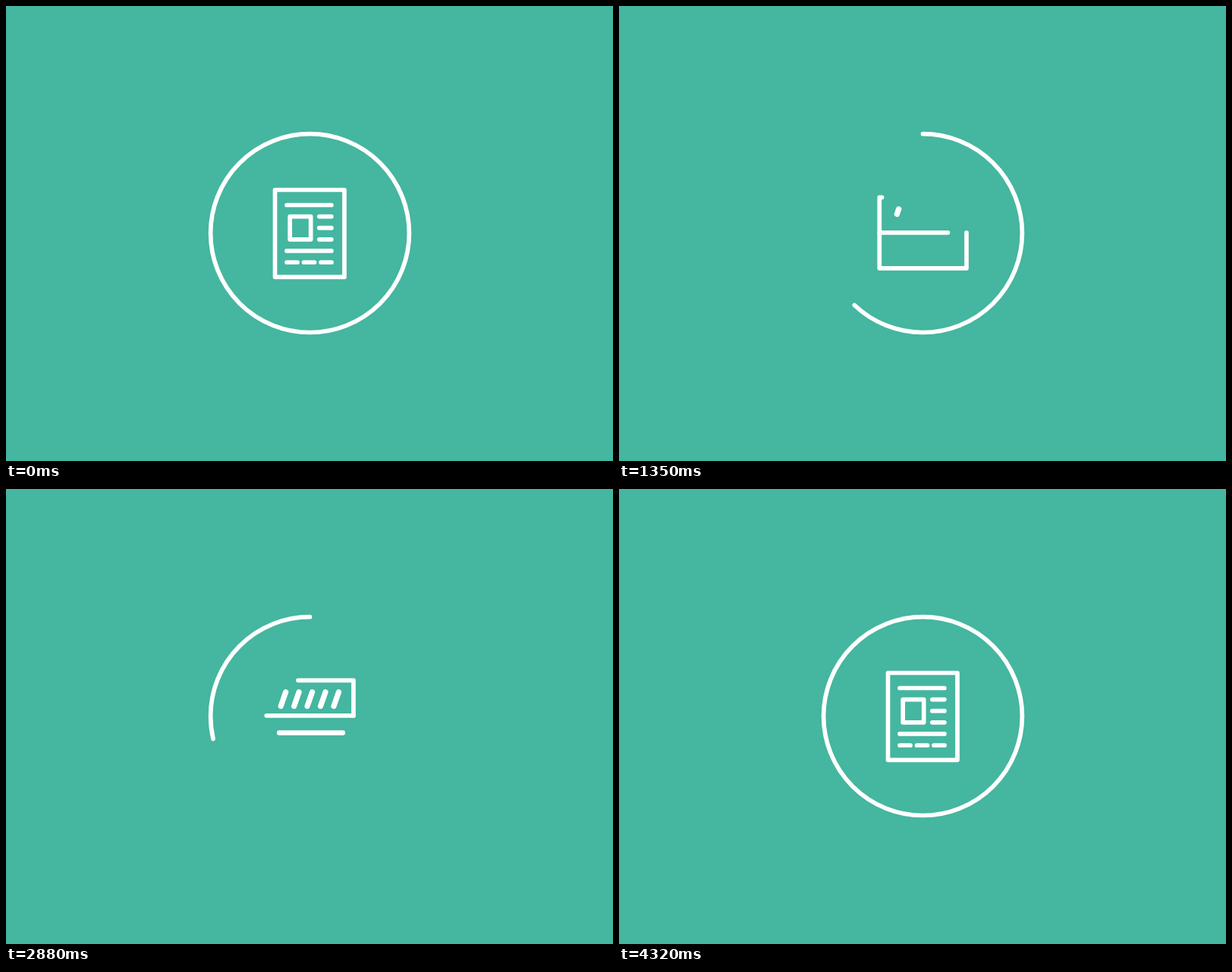
Animation of 800 by 600 pixels, one loop 4500 ms. Source, as an HTML page with a canvas:

```html
<!DOCTYPE html>
<html lang="en">
<head>
<meta charset="utf-8">
<title>Icon loop</title>
<style>
  html, body { margin: 0; width: 100%; height: 100%; overflow: hidden; background: #45b6a0; }
  canvas { display: block; }
</style>
</head>
<body>
<canvas id="stage" width="800" height="600"></canvas>
<script>
const ctx = document.getElementById('stage').getContext('2d');
const LOOP = 4500, TICK = 30, STROKE = 5.7;

const linear = x => x;
const smooth = x => x * x * (3 - 2 * x);
const easeOut = x => 1 - (1 - x) ** 3;

// A span is a stretch of time with an easing; it returns 0 to 1
const span = (start, duration, ease = linear) =>
  t => ease(Math.min(1, Math.max(0, (t - start) / duration)));

// One span per item, each starting a step after the one before
const stagger = (start, step, duration) => i => span(start + step * i, duration);

function polyline(points, width = STROKE) {
  const path = new Path2D();
  let length = 0;
  points.forEach(([x, y], i) => {
    if (i) length += Math.hypot(x - points[i - 1][0], y - points[i - 1][1]);
    path.lineTo(x, y);
  });
  return { path, length, width };
}

const row = (x, y, length, width) => polyline([[x, y], [x + length, y]], width);
const loop = (...points) => polyline([...points, points[0]]);

function makeRing() {
  const r = 130.9, path = new Path2D();
  path.arc(400.5, 299.6, r, -Math.PI / 2, Math.PI * 1.5);
  return { path, length: 2 * Math.PI * r, width: STROKE };
}
const ring = makeRing();

function pageFrame() {
  const l = 354.5, r = 446, t = 242.5, b = 357.3;
  return loop([400.6, t], [r, t], [r, b], [l, b], [l, t]);
}

function pageDetails() {
  const left = 370, right = 428.9, short = 16, dash = 14.1;
  const y = n => 262.5 + 15.1 * n;
  const photoLeft = 374.2, photoRight = 401.7;
  const photo = loop([photoRight, y(1)], [photoLeft, y(1)], [photoLeft, y(3)], [photoRight, y(3)]);
  const dashes = [0, 1, 2].map(i => row(left + 22.5 * i, y(5), dash));
  return [
    row(left, y(0), right - left),
    row(right, y(1), -short),
    row(right - short, y(2), short),
    photo,
    row(right, y(3), -short),
    row(left, y(4), right - left),
    ...dashes
  ];
}

const slateLeft = 343.3, slateRight = 458, slateMiddle = 298.8;

function slateFrame() {
  const l = slateLeft, r = slateRight, t = 252.3, b = 345.8;
  return loop([r, slateMiddle], [r, b], [l, b], [l, t], [r, t]);
}

function slateDetails() {
  const stripes = Array.from({ length: 5 }, (_, i) => {
    const x = 368.7 + 17.45 * i, y = 267.8;
    return polyline([[x, y], [x - 6.5, y + 18.6]], 7.2);
  });
  return [
    row(slateLeft, slateMiddle, slateRight - slateLeft),
    ...stripes,
    row(360, 321.5, 84, 6.4)
  ];
}

// grow moves a line's end along it, wipe moves its beginning
const always = (shapes, grow, wipe) => shapes.map(shape => ({ shape, grow, wipe }));
const inTurn = (shapes, grow, wipe) =>
  shapes.map((shape, i) => ({ shape, grow: grow(i), wipe: wipe(i) }));

// The page stays on screen across the loop point, so its wipe runs past LOOP
const page = [
  ...always([ring, pageFrame()], span(3612, 730, easeOut), span(LOOP + 670, 393, smooth)),
  ...inTurn(pageDetails(), stagger(3644, 64, 150), stagger(LOOP + 798, 42, 70))
];
const slate = [
  ...always([ring, slateFrame()], span(1165, 670, easeOut), span(2502, 585, smooth)),
  ...inTurn(slateDetails(), stagger(1240, 60, 140), stagger(2885, 25, 110))
];
const spinner = always([ring], span(3118, 460, smooth), span(3158, 460, smooth));

function stroke({ shape, grow, wipe }, t) {
  const from = wipe(t), to = grow(t);
  if (to - from < 1e-5) return;
  const full = from === 0 && to > 0.9999;
  ctx.setLineDash(full ? [] : [(to - from) * shape.length, shape.length * 2]);
  ctx.lineDashOffset = -from * shape.length;
  ctx.lineWidth = shape.width;
  ctx.stroke(shape.path);
}

function render(t) {
  ctx.fillStyle = '#45b6a0';
  ctx.fillRect(0, 0, 800, 600);
  ctx.strokeStyle = '#fff';
  ctx.lineCap = ctx.lineJoin = 'round';
  const pageTime = t < 2000 ? t + LOOP : t;
  page.forEach(line => stroke(line, pageTime));
  [...slate, ...spinner].forEach(line => stroke(line, t));
}

const began = performance.now();
function tick() {
  const t = (performance.now() - began) % LOOP;
  render(Math.floor(t / TICK) * TICK);
  requestAnimationFrame(tick);
}
tick();
</script>
</body>
</html>
```
